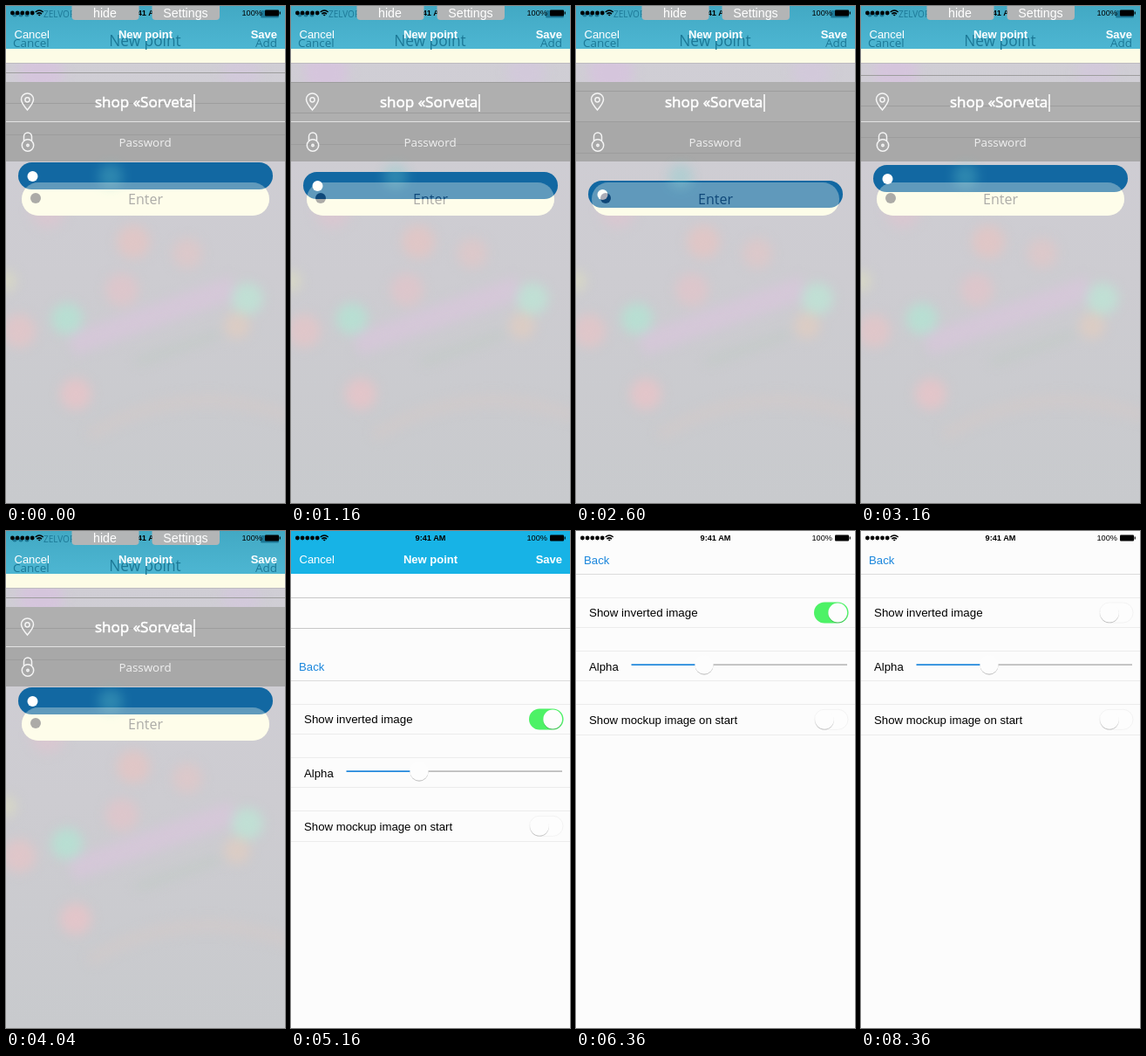
Write an HTML page that moves like this. It is 320 px wide and 569 px high and loops after 8400 ms.

```html
<!DOCTYPE html>
<html lang="en">
<head>
<meta charset="utf-8">
<title>Mockup overlay</title>
<style>
html, body { margin: 0; width: 100%; height: 100%; overflow: hidden; background: #fcfcfc; }
svg { display: block; width: 100vw; height: 100vh; }
text { font: 13.2px "Liberation Sans", Arial, sans-serif; white-space: pre; }
.bold { font-weight: bold; font-size: 13px; }
.small { font-size: 9.2px; }
.mock text { font-family: "Open Sans", sans-serif; }
.mock .btn { font: 14.2px "Liberation Sans", Arial, sans-serif; }
.mid { text-anchor: middle; }
.end { text-anchor: end; }
.icon { fill: none; stroke: #f4f4f4; stroke-width: 1.5; }
.hair { stroke: #ececec; }
.invert { fill: #525243; mix-blend-mode: difference; }
</style>
</head>
<body>
<svg viewBox="0 0 320 569" preserveAspectRatio="none">
  <defs>
    <filter id="soft" x="-50%" y="-50%" width="200%" height="200%" color-interpolation-filters="sRGB">
      <feGaussianBlur stdDeviation="6.5"/>
    </filter>
    <linearGradient id="grey" x2="0" y2="1">
      <stop offset="0" stop-color="#d0ced5"/>
      <stop offset=".5" stop-color="#cdccd1"/>
      <stop offset="1" stop-color="#c8cacd"/>
    </linearGradient>
    <linearGradient id="teal" x2="0" y2="1">
      <stop offset="0" stop-color="#42a9c4"/>
      <stop offset="1" stop-color="#4db6d2"/>
    </linearGradient>
  </defs>
  <rect width="320" height="569" fill="#fcfcfc"/>

  <g class="mock">
    <rect y="49" width="320" height="520" fill="url(#grey)"/>
    <g id="bokeh" filter="url(#soft)">
      <path d="M75 388L262 322" stroke="#d9c6dc" stroke-width="26" opacity=".7"/>
      <path d="M95 492Q205 425 325 470" fill="none" stroke="#d6c9c7" stroke-width="14" opacity=".5"/>
      <path d="M150 408L245 375" stroke="#bfcac3" stroke-width="9" opacity=".6"/>
    </g>
    <rect y="49" width="320" height="16" fill="#fdfce6"/>
    <path d="M0 65.5H320" stroke="#bdbbc0"/>
    <rect y="87" width="320" height="45" fill="#afafaf"/>
    <rect y="133" width="320" height="45" fill="#a8a8a8"/>
    <path d="M0 132.5H320" stroke="#e2e2e2"/>
    <rect x="18" y="202" width="284" height="38" rx="19" fill="#fdfce6"/>
  </g>

  <g id="form">
    <path id="lines" d="M0 76.5H320M0 111.5H320M0 147.5H320" stroke="#c8c8c8"/>
    <use class="mock" href="#lines" style="mix-blend-mode:multiply"/>
    <rect x="14" y="179" width="292" height="31" rx="15.5" fill="#1268a2"/>
    <circle cx="30.5" cy="195" r="6" fill="#fff"/>
  </g>

  <g class="mock">
    <circle cx="120" cy="195" r="14" fill="#6fd0d0" opacity=".3" filter="url(#soft)"/>
    <rect x="18" y="202" width="284" height="38" rx="19" fill="#fffff0" opacity=".33"/>
    <circle class="invert" cx="34" cy="220" r="6"/>
    <text class="invert mid" x="160" y="226.5" style="font-size:16px">Enter</text>
    <text x="102" y="116" fill="#fff" stroke="#fff" stroke-width=".6" style="font-size:17px">shop «Sorveta</text>
    <path d="M216 101V121" stroke="#fff" stroke-width="1.5"/>
    <text class="mid" x="159.5" y="161" fill="#f0f0f0" style="font-size:13.4px">Password</text>
    <g class="icon">
      <path d="M24.5 119Q17.5 111 17.5 107A7 7 0 0 1 31.5 107Q31.5 111 24.5 119Z"/>
      <circle cx="24.5" cy="107.3" r="2.6"/>
      <circle cx="25" cy="159.5" r="6.7"/>
      <path d="M20.5 154V149.5A4.5 4.5 0 0 1 29.5 149.5V154"/>
      <circle cx="25" cy="159.5" r="1.2"/>
    </g>
  </g>

  <rect width="320" height="49" fill="#17b3e6"/>
  <g class="mock">
    <rect width="320" height="49" fill="url(#teal)"/>
    <g fill="#1c7896">
      <text x="8" y="46.5" style="font-size:13.5px">Cancel</text>
      <text class="mid" x="159.5" y="46" style="font-size:17.3px">New point</text>
      <text class="end" x="311" y="46.5" style="font-size:13.5px">Add</text>
      <text x="43" y="13" style="font-size:10px">ZELVOR</text>
      <circle cx="10" cy="10" r="2.5"/><circle cx="17" cy="10" r="2.5"/><circle cx="24" cy="10" r="2.5"/>
      <rect x="292" y="5" width="21" height="8.5" rx="1.5"/>
    </g>
  </g>
  <g fill="#fff">
    <text x="9.5" y="37" style="font-size:13px">Cancel</text>
    <text class="bold mid" x="160" y="37">New point</text>
    <text class="bold end" x="311" y="37">Save</text>
  </g>

  <g id="sheet">
    <rect width="320" height="569" fill="#fcfcfc"/>
    <path d="M0 49.5H320" stroke="#dcdcdc"/>
    <path class="hair" d="M0 76.5H320M0 110.5H320M0 137.5H320M0 171.5H320M0 198.5H320M0 233.5H320"/>
    <text x="9" y="37.5" fill="#1a86dc">Back</text>
    <text x="15" y="98.3" style="font-size:13.35px">Show inverted image</text>
    <text x="15" y="159.5">Alpha</text>
    <text x="15" y="220.5">Show mockup image on start</text>
    <path d="M63.5 153.2H147" stroke="#2389dc" stroke-width="1.8"/>
    <path d="M147 153.2H311" stroke="#bdbdbd" stroke-width="1.8"/>
    <circle cx="147" cy="154.2" r="10.5" fill="#c4c4c4"/>
    <circle cx="147" cy="153" r="10.6" fill="#fdfdfd"/>
  </g>

  <g>
    <g id="dots"></g>
    <path d="M33.7 7Q38.2 3 42.7 7M35.4 9.1Q38.2 6.7 41 9.1" fill="none" stroke="#000" stroke-width="1.5"/>
    <path d="M38.2 11.6L36.6 10Q38.2 8.8 39.8 10Z"/>
    <text class="bold mid" x="160" y="11.3" style="font-size:9.2px">9:41 AM</text>
    <text class="small" x="270.5" y="11.3">100%</text>
    <rect x="297" y="4.5" width="16" height="7" rx="1"/>
    <rect x="313.6" y="6.5" width="1.2" height="3"/>
  </g>

  <g class="mock">
    <g fill="#b3b5b6">
      <rect x="75.5" y="-4" width="77" height="20" rx="4"/>
      <rect x="167.5" y="-4" width="77.5" height="20" rx="4"/>
    </g>
    <g fill="#fff">
      <text class="btn mid" x="113.5" y="13">hide</text>
      <text class="btn mid" x="206" y="13">Settings</text>
    </g>
  </g>
</svg>
<script>
const LOOP = 8400, STEP = 40, OPEN = 5001, FLIP = 7160, FLIP_TIME = 240;
// [ms, pull-down distance]
const PULL = [[0, 0], [400, 0], [1160, 11], [1800, 20], [2400, 23], [2850, 18], [3160, 3], [3400, 0], [LOOP, 0]];
// [x, y, radius, colour]
const BLOBS = [
  [70, 358, 18, '#b8ded2'], [277, 335, 18, '#c0dfd4'], [80, 444, 18, '#e2c5c9'],
  [146, 270, 19, '#dfc6c6'], [208, 283, 17, '#dbc8ca'], [133, 325, 19, '#dcc6cb'],
  [15, 372, 19, '#dfc6c9'], [265, 366, 15, '#dbccc4'], [48, 234, 20, '#d8c7d0'],
  [0, 315, 12, '#d6d6c6'], [40, 76, 26, '#d5c5dc'], [270, 76, 22, '#d2c9da']
];

const $ = id => document.getElementById(id);

function add(parent, tag, attrs) {
  const el = document.createElementNS('http://www.w3.org/2000/svg', tag);
  for (const k in attrs) el.setAttribute(k, attrs[k]);
  return parent.appendChild(el);
}

function makeSwitch(cy) {
  const g = $('sheet');
  add(g, 'rect', { x: 273.5, y: cy - 11.5, width: 38.5, height: 23, rx: 11.5, fill: '#fdfdfd', stroke: '#f3f3f3' });
  const track = add(g, 'rect', { x: 273, y: cy - 12, width: 39.5, height: 24, rx: 12, fill: '#4df266' });
  const knob = add(g, 'g', {});
  add(knob, 'circle', { cx: 285, cy: cy + 1, r: 10.8, fill: '#000', opacity: .24 });
  add(knob, 'circle', { cx: 285, cy: cy, r: 10.9, fill: '#fdfdfd' });
  return on => {
    track.setAttribute('opacity', on);
    knob.setAttribute('transform', `translate(${on * 15.2} 0)`);
  };
}

const ease = p => p * p * (3 - 2 * p);
const clamp = p => Math.min(1, Math.max(0, p));

function pullAt(t) {
  const i = PULL.findIndex(k => k[0] > t);
  const [t0, a] = PULL[i - 1], [t1, b] = PULL[i];
  return Math.round(a + (b - a) * (t - t0) / (t1 - t0));
}

// Critically damped spring from the bottom edge to rest
function sheetAt(t) {
  const u = Math.max(0, t - OPEN) * 0.01826;
  return Math.round(569 * (1 + u) * Math.exp(-u));
}

for (const [cx, cy, r, fill] of BLOBS) add($('bokeh'), 'circle', { cx, cy, r, fill });
for (let i = 0; i < 5; i++) add($('dots'), 'circle', { cx: 7.4 + i * 5.7, cy: 8, r: 2.4 });

const inverted = makeSwitch(93.5);
makeSwitch(215.8)(0);
const mock = document.querySelectorAll('.mock');

function draw(t) {
  for (const el of mock) el.style.display = t < OPEN ? '' : 'none';
  $('form').setAttribute('transform', `translate(0 ${pullAt(t)})`);
  $('sheet').setAttribute('transform', `translate(0 ${sheetAt(t)})`);
  inverted(1 - ease(clamp((t - FLIP) / FLIP_TIME)));
}

const start = performance.now();
function tick() {
  const t = (performance.now() - start + 4) % LOOP;
  draw(Math.floor(t / STEP) * STEP);
  requestAnimationFrame(tick);
}
tick();
</script>
</body>
</html>
```
